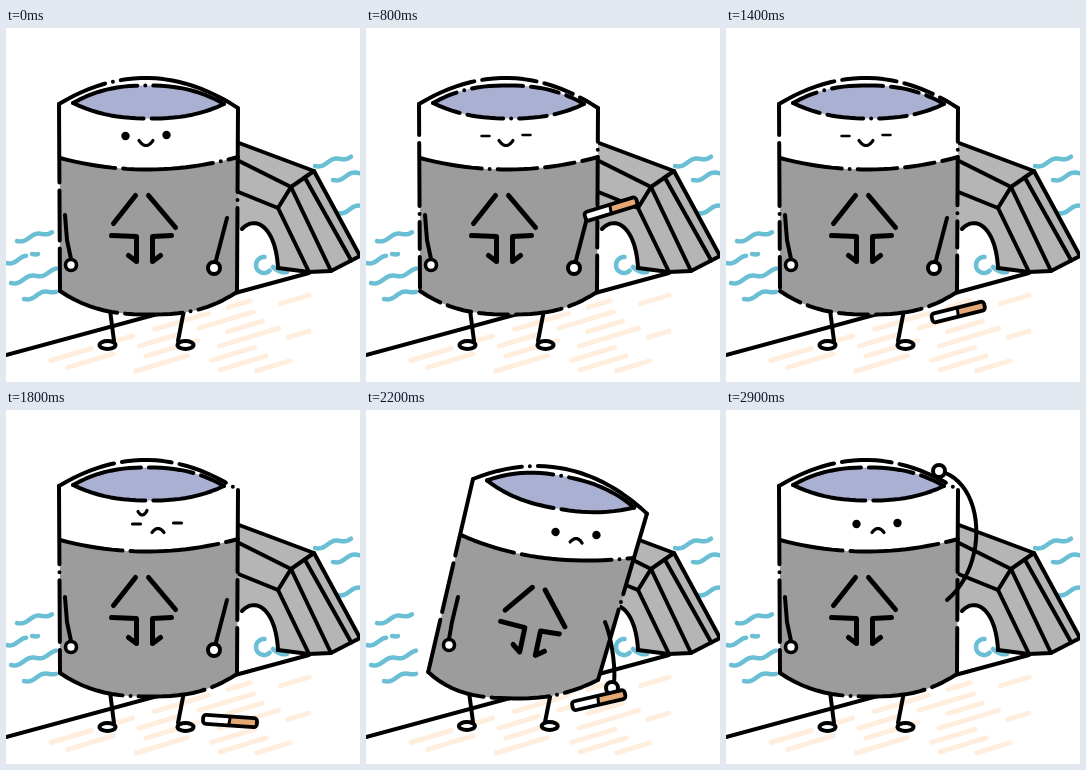
Recreate the animation shown at these times as an HTML page with a canvas. Size 354 by 354 pixels, loop 3000 ms.

```html
<!DOCTYPE html>
<html lang="en">
<head>
<meta charset="utf-8">
<style>
  html, body { margin: 0; width: 100%; height: 100%; overflow: hidden; background: #fff; }
  canvas { display: block; width: 100vmin; height: 100vmin; }
</style>
</head>
<body>
<canvas id="stage" width="354" height="354"></canvas>
<script>
const ctx = document.getElementById('stage').getContext('2d');
const BODY = '#9c9c9c', STONE = '#b5b5b5', INSIDE = '#a9b0d1';
const WATER = '#6bbfd4', SAND = '#ffeede', FILTER = '#e5a875';
const STEP = 100, COUNT = 30;

const mix = (a, b, k) => a + (b - a) * k;
const mixPoint = (p, q, k) => [mix(p[0], q[0], k), mix(p[1], q[1], k)];
const clamp = k => Math.max(0, Math.min(1, k));
const ramp = (n, from, to) => clamp((n - from) / (to - from));
const smooth = k => k * k * (3 - 2 * k);
const sample = (f, count = 24) => Array.from({ length: count + 1 }, (_, i) => f(i / count));

function seeded(seed) {
  return () => {
    seed = (seed * 16807 + 11) % 2147483647;
    return seed / 2147483647;
  };
}

function path(points) {
  ctx.beginPath();
  points.forEach(p => ctx.lineTo(...p));
}

function stroke(points, width = 4, color = '#000', dash = []) {
  path(points);
  ctx.setLineDash(dash);
  ctx.lineWidth = width;
  ctx.strokeStyle = color;
  ctx.stroke();
  ctx.setLineDash([]);
}

function fill(points, color) {
  path(points);
  ctx.fillStyle = color;
  ctx.fill();
}

function oval(x, y, rx, ry, color, outline = 0) {
  ctx.beginPath();
  ctx.ellipse(x, y, rx, ry, 0, 0, 7);
  ctx.fillStyle = color;
  ctx.fill();
  if (!outline) return;
  ctx.lineWidth = outline;
  ctx.strokeStyle = '#000';
  ctx.stroke();
}

// A bow between two points; higher powers give squarer shoulders.
const bow = (a, b, sag, power = 2) => sample(u => {
  const [x, y] = mixPoint(a, b, u);
  return [x, y + sag * (1 - Math.abs(2 * u - 1) ** power)];
});

const bezier = (a, b, c, d) => sample(t => {
  const ab = mixPoint(a, b, t), bc = mixPoint(b, c, t), cd = mixPoint(c, d, t);
  return mixPoint(mixPoint(ab, bc, t), mixPoint(bc, cd, t), t);
});

// Long dashes with an occasional dot between them.
function brokenLine(seed, length) {
  const random = seeded(seed * 7919 + 5), dash = [];
  for (let i = 0; i < 8; i++) {
    dash.push(length * (.5 + random()), 8);
    if (random() < .35) dash.push(0, 8);
  }
  return dash;
}

function wave(x, y, length) {
  stroke(sample(t => {
    const d = t * length;
    return [x + d, y - .28 * d + 1.8 * Math.sin(d / 4)];
  }), 4.5, WATER);
}

function sand() {
  const random = seeded(42);
  for (let row = 0; row < 7; row++) {
    let x = 45 + 20 * random();
    while (x < 285) {
      const length = 18 + 42 * random(), end = Math.min(x + length, 303);
      const level = 346 + 12 * row, y = level - .3 * x;
      if (y < 350 && y > 275 - x / 50) stroke([[x, y], [end, level - .3 * end]], 5, SAND);
      x = end + 18 + 24 * random();
    }
  }
}

function bridge() {
  const crest = [308, 143], edge = [285, 159], brow = [272, 180];
  const foot = [[354, 228], [325, 243], [303, 244], [272, 240]];
  const arch = bezier(foot[3], [270, 200], [250, 186], [236, 201]);
  fill([[225, 112], crest, ...foot, ...arch, [225, 201]], STONE);
  stroke(arch);
  stroke([[225, 112], crest, ...foot]);
  stroke([[225, 129], edge, crest]);
  stroke([[225, 161], brow, edge]);
  stroke([brow, foot[2]]);
  stroke([edge, foot[1]]);
  stroke([mixPoint(edge, crest, .6), mixPoint(foot[1], foot[0], .7)]);
}

function scenery() {
  sand();
  wave(11, 213, 35);
  wave(0, 235, 20);
  wave(26, 226, 6);
  wave(5, 255, 45);
  wave(18, 271, 32);
  wave(309, 138, 36);
  wave(327, 152, 30);
  wave(331, 185, 30);
  stroke(sample(t => {
    const a = -1.5 - 4 * t;
    return [258 + 8 * Math.cos(a), 237 + 8 * Math.sin(a)];
  }), 4.5, WATER);
  stroke(bow([267, 239], [281, 244], 2), 4.5, WATER);
  stroke([[0, 327], [303, 245]]);
  bridge();
}

// Draws a part that tilts and slides along when the cup leans.
function leaning(lean, x, y, dx, dy, angle, drawPart) {
  ctx.save();
  ctx.translate(x + dx * lean, y + dy * lean);
  ctx.rotate(angle * lean);
  drawPart();
  ctx.restore();
}

function emblem() {
  stroke([[-9, -30], [-31, -2]], 5);
  stroke([[4, -30], [31, 2]], 5);
  for (const side of [-1, 1]) {
    const inner = side < 0 ? -8 : 8;
    stroke([[side * 30 - 3, 10], [inner, 11], [inner, 36], [inner + side * 8, 30]], 5);
  }
}

function face(n) {
  const happy = n < 15, annoyed = n === 17 || n === 18;
  const center = happy ? -11 : 0;
  for (const side of [-1, 1]) {
    const x = center + side * 20.5, y = (happy ? -6 : 0) - side * .5;
    if (happy && n % 3 === 2) stroke([[x - 4, y], [x + 4, y]], 2.5);
    else if (annoyed) stroke([[x - 4, y], [x + 4, y]], 3.2);
    else oval(x, y, 4.2, 4.2, '#000');
  }
  if (annoyed) stroke(bow([-19, -12], [-10, -13], 4), 3.2);
  if (happy) stroke(bow([center - 7, -1], [center + 7, -1], 5), 3.2);
  else stroke(bow([-5, 9], [7, 9], -4), 3.2);
}

function legs(lean) {
  for (const side of [-1, 1]) {
    const shift = lean * (side < 0 ? -1 : 7);
    const foot = [140.5 + side * 39 + shift * .6, 317 - lean];
    stroke([[141 + side * 37 + shift, 282], [140 + side * 32 + shift, foot[1] - 4]]);
    oval(...foot, 8, 4, '#fff', 4);
  }
}

function mug(n, lean) {
  // The top travels furthest and the right side sinks.
  const warp = points => points.map(([x, y]) => {
    const u = (x - 53) / 179, v = (264 - y) / 188;
    return [x + lean * mix(8 - 7 * u, 54 - 4 * u, v), y + lean * mix(7 * u - 1, 31 * u - 7, v)];
  });
  const top = [[53, 76], [232, 80]], bottom = [[54, 263], [231, 264]];
  const rim = warp(bow(...top, -28));
  const band = warp(bow([54, 130], [232, 129], 12));
  const base = warp(bow(...bottom, 23, 2.6));
  const lens = warp(bow([67, 75], [218, 76], -18, 2.4));
  const lip = warp(bow([67, 75], [218, 76], 15, 2.4));
  const sides = [0, 1].map(i => warp([top[i], bottom[i]]));

  legs(lean);
  fill([...rim, ...band.toReversed()], '#fff');
  fill([...band, ...base.toReversed()], BODY);
  fill([...lens, ...lip.toReversed()], INSIDE);
  const look = (n < 15 ? n : n < 19 ? n + 1 : n + 2) % 3;
  const length = [90, 60, 42][look];
  [rim, band, base, lens, lip, ...sides].forEach((edge, i) =>
    stroke(edge, 4, '#000', brokenLine(1 + i + 7 * look, length)));

  leaning(lean, 138.5, 197.5, 30.5, 11, .21, emblem);
  leaning(lean, 151, 113.5, 59, 10, .1, () => face(n));

  const hand = [65 + 18 * lean, 237 - 2 * lean];
  stroke([[59 + 33 * lean, 187], [61 + 25 * lean, 212], [hand[0], hand[1] - 6]]);
  oval(...hand, 5.5, 5.5, '#fff', 3.6);
}

// Reach down, then swing out and up to the rim.
function handAt(reach, raise) {
  const low = mixPoint([208, 240], [246, 278], reach);
  const [x, y] = mixPoint(low, [213, 61], raise);
  return [x + 60 * Math.sin(Math.PI * raise), y];
}

function arm(hand, lean, raise) {
  const shoulder = [221 + 18 * lean, 190 + 22 * lean];
  const bulge = 45 * raise + 6 * lean;
  const control = k => {
    const [x, y] = mixPoint(shoulder, hand, k);
    return [x + bulge, y];
  };
  stroke(bezier(shoulder, control(.28), control(.92), hand));
  oval(...hand, 6, 6, '#fff', 4);
}

// Thrown in, falls, hops once and settles; returns x, y and angle.
function tossed(n) {
  if (n < 8) {
    const k = ramp(n, 3, 8) ** 1.5;
    return [mix(350, 245, k), mix(84, 181, k), mix(.26, -.3, k)];
  }
  if (n < 11) {
    const k = ramp(n, 8, 11);
    return [mix(245, 257, k), mix(181, 312, k * k), mix(-.3, .14, k)];
  }
  const k = ramp(n, 11, 15), hop = 4 * k * (1 - k);
  return [mix(257, 224, k), 311 - 36 * hop, .07 - .42 * hop];
}

function carried(hand, raise) {
  const grip = mix(2.4, -2.4, raise);
  return [hand[0] + 18 * Math.cos(grip), hand[1] + 18 * Math.sin(grip), mix(-.23, -1, raise)];
}

function cigarette([x, y, angle]) {
  ctx.save();
  ctx.translate(x, y);
  ctx.rotate(angle);
  ctx.fillStyle = '#fff';
  ctx.fillRect(-27, -4.5, 28, 9);
  ctx.fillStyle = FILTER;
  ctx.fillRect(0, -4.5, 27, 9);
  ctx.beginPath();
  ctx.roundRect(-27, -4.5, 54, 9, 3);
  ctx.lineWidth = 3.8;
  ctx.strokeStyle = '#000';
  ctx.stroke();
  stroke([[0, -4], [-1, 4]], 3);
  ctx.restore();
}

function draw(n) {
  const reach = smooth(ramp(n, 18, 21));
  const lean = reach * (1 - ramp(n, 22, 24));
  const raise = ramp(n, 22, 26);
  const hand = handAt(reach, raise);
  ctx.fillStyle = '#fff';
  ctx.fillRect(0, 0, 354, 354);
  ctx.lineCap = ctx.lineJoin = 'round';
  scenery();
  mug(n, lean);
  arm(hand, lean, raise);
  if (n >= 3 && n <= 26) cigarette(n < 21 ? tossed(n) : carried(hand, raise));
}

const start = performance.now();
function tick(now) {
  draw(Math.floor(Math.max(0, now - start) / STEP) % COUNT);
  requestAnimationFrame(tick);
}
draw(0);
requestAnimationFrame(tick);
</script>
</body>
</html>
```
